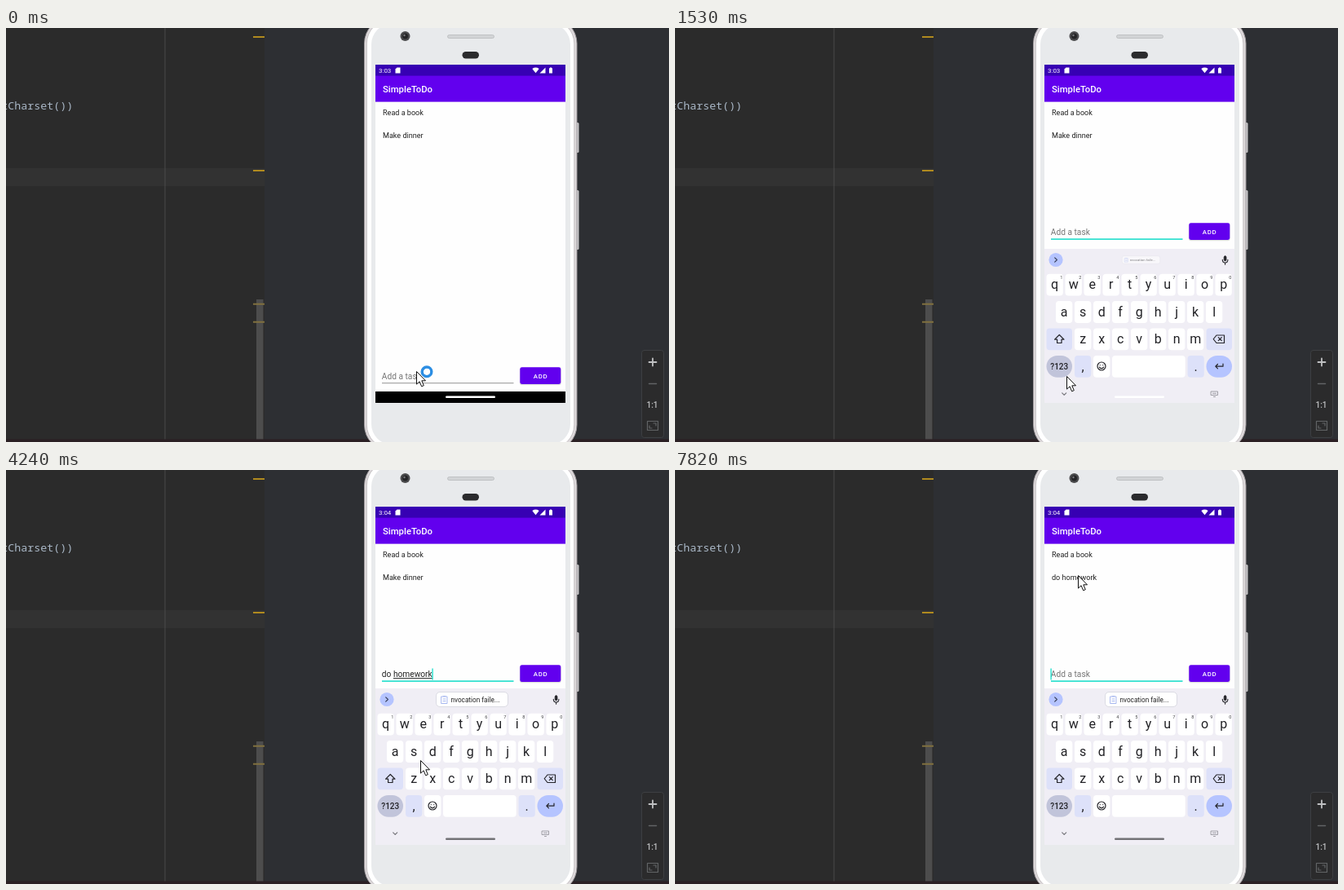
These frames come from a looping animation (813x508 px, 8 s). An HTML page:

```html
<!DOCTYPE html>
<html lang="en">
<head>
<meta charset="utf-8">
<title>Simple to-do demo</title>
<style>
  html, body { margin: 0; width: 100%; height: 100%; overflow: hidden; background: #2b2b2b; }
  svg { display: block; width: 813px; height: 508px; font-family: Roboto, sans-serif; }
  text { white-space: pre; }
  .line { fill: none; stroke-linecap: round; stroke-linejoin: round; }
  .item { font-size: 9.07px; fill: #222; }
  .mid { text-anchor: middle; }
  .bold { font-weight: 500; }
</style>
</head>
<body>
<svg viewBox="0 0 813 508">
  <defs>
    <clipPath id="screen"><rect x="453" y="45" width="233" height="415"/></clipPath>
  </defs>

  <!-- editor -->
  <rect width="317" height="508" fill="#2b2b2b"/>
  <rect y="172" width="317" height="22" fill="#323232"/>
  <rect x="194.5" width="1" height="508" fill="#4b4b4b"/>
  <text x="82.300" y="100" text-anchor="end" font-size="13.35" fill="#a9b7c6" style="font-family:'Noto Sans Mono',monospace">tCharset())</text>
  <rect x="307" y="333" width="8.5" height="175" fill="#4d4d4d"/>
  <path d="M303 11h14M303 175h14" stroke="#b08a1f" stroke-width="2"/>
  <path d="M303 338.700h14M303 360.700h14" stroke="#80703f" stroke-width="2"/>
  <rect x="317" width="496" height="508" fill="#2d2f33"/>

  <!-- zoom panel -->
  <g class="line">
    <rect x="779.500" y="395.500" width="27" height="107" rx="3" fill="#2b2b2c" stroke="#3d3f42"/>
    <path d="M788.500 410h9M793 405.500v9" stroke="#c0c1c3" stroke-width="1.800"/>
    <path d="M788.500 436.500h9" stroke="#626466" stroke-width="1.500"/>
    <path d="M786.500 482.500h13v11h-13zM789 488v3h3M794 485h3v3" stroke="#626466" stroke-width="1.200"/>
  </g>
  <text class="mid bold" x="792.500" y="465.500" font-size="10" fill="#c0c1c3">1:1</text>
  <rect y="504.500" width="813" height="3.500" fill="#2b2024"/>

  <!-- phone -->
  <rect x="698" y="116" width="4.500" height="37" rx="1.500" fill="#c9c8ca"/>
  <rect x="698" y="199" width="4.500" height="73" rx="1.500" fill="#c9c8ca"/>
  <rect x="439.500" y="-13" width="260.500" height="532" rx="32" fill="#dedadc" stroke="#a39ea1"/>
  <rect x="442.300" y="-10" width="254.500" height="526" rx="29" fill="#fff" stroke="#b9b4b7" stroke-width=".8"/>
  <rect x="448" y="-5" width="244" height="516" rx="25" fill="#e8eaec"/>
  <circle cx="489.500" cy="10" r="6" fill="#4b4b4d"/>
  <circle cx="489.500" cy="10" r="3.500" fill="#252527"/>
  <circle cx="488.500" cy="9" r="1.200" fill="#77777b"/>
  <rect x="541.500" y="8.500" width="57" height="4" rx="2" fill="#d2d4d6" stroke="#b9bbbd" stroke-width=".8"/>
  <rect x="559.500" y="29" width="20.500" height="8.500" rx="4.200" fill="#2b2b2d"/>

  <g clip-path="url(#screen)">
    <rect x="453" y="45" width="233" height="415" fill="#fefefe"/>
    <rect x="453" y="45" width="233" height="14" fill="#3700b3"/>
    <rect x="453" y="58.600" width="233" height="32" fill="#6200ee"/>
    <text id="clock" x="457" y="54.700" font-size="7.940" fill="#fff"></text>
    <g fill="#fff">
      <path d="M479.500 48.500h4v7h-6v-5z"/>
      <path d="M645.300 50q4.200-2.800 8.400 0l-4.200 5.200z"/>
      <path d="M661.500 48.500v7h-7z"/>
      <path d="M666 49.300h1v-.8h2v.8h1v6.200h-4z"/>
    </g>
    <text class="bold" x="462" y="78.500" font-size="11.340" fill="#fff">SimpleToDo</text>
    <g id="items"></g>

    <!-- input row -->
    <g id="row">
      <text id="hint" x="460.800" y="431.200" font-size="10.200" fill="#757575">Add a task</text>
      <text id="typed" x="460.800" y="431.200" font-size="10.200" fill="#222"><tspan></tspan><tspan text-decoration="underline"></tspan><tspan></tspan></text>
      <rect id="rule" x="461" y="435.400" width="161.500"/>
      <rect id="caret" y="420.500" width="1.200" height="14" fill="#03dac5"/>
      <rect id="shade" x="629.800" y="417.200" width="51" height="21" rx="3" fill="#000"/>
      <rect x="630.300" y="416.200" width="50" height="20.700" rx="2.300" fill="#6200ee"/>
      <text class="mid bold" x="655.600" y="429.700" font-size="7.940" letter-spacing=".7" fill="#fff">ADD</text>
    </g>
    <rect x="453" y="446" width="233" height="14" fill="#000"/>

    <!-- keyboard at its resting place -->
    <g id="board">
      <rect x="453" y="268" width="233" height="200" fill="#f0eef5"/>
      <circle cx="467" cy="281.500" r="8.600" fill="#b5c4ff"/>
      <path class="line" d="M465.700 278.800l2.700 2.700-2.700 2.700" stroke="#30374f" stroke-width="1.100"/>
      <g id="chip">
        <rect x="527.500" y="272.500" width="88" height="18" rx="4.500" fill="#fff" stroke="#dbdbe3"/>
        <path class="line" d="M534 278h7v8.500h-7zM536 277.500h3M536 281h3M536 283.500h3" stroke="#a9b9ef"/>
        <text x="545.500" y="284.600" font-size="8.200" fill="#222">nvocation faile...</text>
      </g>
      <g class="line" stroke="#25252a">
        <rect x="673.200" y="276.800" width="2.800" height="6" rx="1.400" fill="#25252a" stroke-width=".8"/>
        <path d="M671.300 281.300q0 3.700 3.300 3.700t3.300-3.700M674.600 285v2.200" stroke-width="1.100"/>
      </g>
      <g id="keys"></g>
      <g class="line" stroke="#25252a" stroke-width="1.200">
        <path d="M471.300 373.500l5.700 5.700h-3v4.300h-5.400v-4.300h-3z"/>
        <path d="M664 374h9.500v9.500h-9.500l-3.800-4.750zM666.300 376.700l4 4M670.300 376.700l-4 4"/>
        <circle cx="523" cy="412" r="5"/>
        <path d="M520.300 413.200q2.700 3.400 5.400 0M521.200 410.500v.2M524.800 410.500v.2"/>
        <path d="M672 409v3.200h-9M665.500 409.500l-2.700 2.700 2.700 2.700"/>
        <path d="M474.700 444.800l2.500 2.500 2.500-2.500" stroke="#77767c"/>
        <path d="M657.500 443h8v4.500h-8zM659.500 445.300h4M660.500 449.500h2" stroke="#96959c" stroke-width=".9"/>
      </g>
    </g>
    <rect id="pill" x="539" y="451.500" width="61" height="2.500" rx="1.250"/>
  </g>

  <g id="mouse">
    <g id="busy" class="line">
      <circle cx="13" cy=".8" r="5.800" fill="#fff" stroke="#2c8ee3" stroke-width="3.400"/>
      <path id="glint" d="M7.200 .8a5.800 5.800 0 0 0 4.300 5.600" stroke="#45c3ee" stroke-width="3"/>
    </g>
    <path d="M.5 .5v15.600l3.600-3.300 2.500 6 2.700-1.100-2.500-5.900h4.700z" fill="#fff" stroke="#111" stroke-linejoin="round"/>
  </g>
</svg>

<script>
const $ = id => document.getElementById(id);
const NS = 'http://www.w3.org/2000/svg';
const LOOP = 8000, LIFT = 177;

function add(parent, tag, attrs, text = '') {
  const el = parent.appendChild(document.createElementNS(NS, tag));
  for (const name in attrs) el.setAttribute(name, attrs[name]);
  el.textContent = text;
  return el;
}

// keyboard keys
const LIGHT = '#fff', SOFT = '#dde1f9';
const keys = $('keys');
function key(x, row, width, fill, label = '', size = 16, rx = 4) {
  const y = 298.7 + 33.4 * row;
  add(keys, 'rect', { x, y, width, height: 26.8, rx, fill });
  add(keys, 'text', { x: x + width / 2, y: y + 13.2 + size * .34, class: size < 16 ? 'mid bold' : 'mid',
    'font-size': size, fill: '#222226' }, label);
}
['qwertyuiop', 'asdfghjkl', 'zxcvbnm'].forEach((letters, row) => {
  [...letters].forEach((c, i) => {
    const x = [455.5, 467, 490][row] + 23 * i;
    key(x, row, 20.3, LIGHT, c);
    if (!row) add(keys, 'text', { x: x + 18.3, y: 305.4, class: 'mid', 'font-size': 5.6, fill: '#44444a' }, (i + 1) % 10);
  });
});
key(455.5, 2, 31.5, SOFT);
key(651.5, 2, 31.5, SOFT);
key(455.5, 3, 31.5, '#c1c4da', '?123', 10, 13.4);
key(490, 3, 20.3, SOFT, ',');
key(513, 3, 20.3, LIGHT);
key(536, 3, 89.7, LIGHT);
key(628.5, 3, 20.3, SOFT, '.');
key(651.5, 3, 31.5, '#b5c4ff', '', 16, 13.4);

// list rows
const rows = [['Read a book', 0], ['Make dinner', 1], ['do homework', 2], ['do homework', 1]].map(([text, n]) =>
  add($('items'), 'text', { x: 462, y: 107.2 + 27.3 * n, class: 'item' }, text));

// value of the last step reached: [time, value, time, value, ...]
function at(t, steps) {
  let i = 0;
  while (i + 2 < steps.length && steps[i + 2] <= t) i += 2;
  return steps[i + 1];
}

const MOUSE = [0, [503, 421], 120, [495, 427], 1020, [476, 428], 1140, [478, 427], 1260, [480, 427],
  1790, [488, 402], 1920, [508, 356],
  4620, [580, 309], 4740, [661, 255], 4880, [660, 253], 5000, [657, 251], 5120, [653, 250], 5240, [651, 249],
  6420, [632, 224], 6540, [570, 176], 6660, [523, 150], 6810, [508, 139], 6930, [497, 131], 7050, [494, 129]];
// plain / underlined / plain
const TYPED = [0, '//', 2460, '/d/', 3100, '/do/', 3220, 'do /h/', 3460, 'do /home/', 3720, 'do /homew/',
  3840, 'do /homewor/', 3960, 'do /homewor/k', 4240, 'do /homework/', 5880, '//'];
const CARET = [0, 0, 1260, 1, 1530, 0, 1790, 1, 2200, 0, 2460, 1, 4620, 0, 5000, 1, 5760, 0,
  5880, 1, 6420, 0, 6930, 1, 7420, 0, 7820, 1];
const SLIDE = [0, 200, 1410, 60, 1530, 3, 1650, 0];
const PILL = [0, '#fff', 1790, '#d0cfd3', 1920, '#b0afb3', 2200, '#98979b', 2460, '#88878b', 2580, '#7b7a7e', 3100, '#737276'];
const SHADE = [0, .12, 5760, .35, 6000, .25, 6150, .18, 6270, .12];
const OPACITY = [
  [0, 1],
  [0, 1, 7700, .5, 7820, 0],
  [0, 0, 6000, .35, 6150, .75, 6270, 1, 7700, .5, 7820, 0],
  [0, 0, 7700, .5, 7820, 1]];

function draw(t) {
  const focus = t >= 1260, open = t >= 1410;
  $('clock').textContent = t < 2460 ? '3:03' : '3:04';
  rows.forEach((row, i) => row.setAttribute('opacity', at(t, OPACITY[i])));

  const text = $('typed'), parts = at(t, TYPED).split('/');
  parts.forEach((part, i) => text.children[i].textContent = part);
  const empty = !parts.join('');
  $('hint').setAttribute('opacity', +empty);
  $('caret').setAttribute('x', 460.5 + (empty ? 0 : text.getComputedTextLength()));
  $('caret').setAttribute('opacity', at(t, CARET));
  $('row').setAttribute('transform', `translate(0 ${open ? -LIFT : 0})`);
  $('rule').setAttribute('height', focus ? 1.4 : .8);
  $('rule').setAttribute('fill', focus ? '#03dac5' : '#777');
  $('shade').setAttribute('opacity', at(t, SHADE));

  $('board').setAttribute('transform', `translate(0 ${at(t, SLIDE)})`);
  $('chip').setAttribute('opacity', at(t, [0, 0, 1530, .55, 1650, 1]));
  $('chip').setAttribute('transform', `translate(571.5 281.5) scale(${t < 1650 ? .53 : 1}) translate(-571.5 -281.5)`);
  $('pill').setAttribute('fill', at(t, PILL));

  $('mouse').setAttribute('transform', `translate(${at(t, MOUSE)})`);
  $('busy').setAttribute('opacity', t < 1260 ? 1 : 0);
  $('glint').setAttribute('opacity', t < 1020 ? 0 : 1);
}

function frame(now) {
  draw(now % LOOP);
  requestAnimationFrame(frame);
}
draw(0);
requestAnimationFrame(frame);
</script>
</body>
</html>
```
